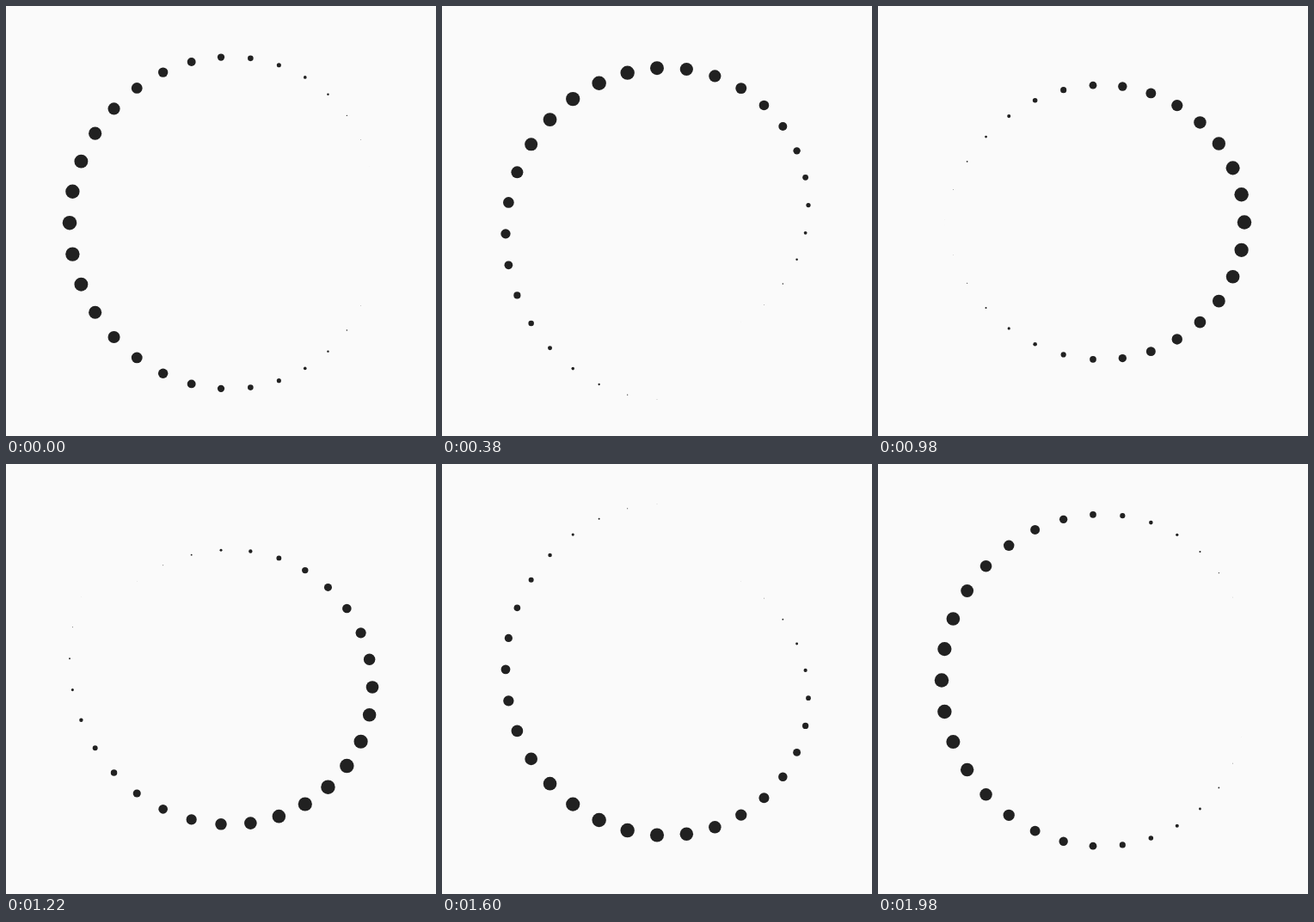
These frames come from a looping animation (500 by 500 pixels, 2000 ms). An HTML page with a canvas:

```html
<!DOCTYPE html>
<html lang="en">
<head>
<meta charset="utf-8">
<title>Falling dot ring</title>
<style>
html, body { margin: 0; width: 100%; height: 100%; overflow: hidden; background: #fafafa; }
canvas { display: block; width: 500px; height: 500px; }
</style>
</head>
<body>
<canvas id="stage" width="500" height="500"></canvas>
<script>
const ctx = document.getElementById('stage').getContext('2d');
const TAU = Math.PI * 2;
const LOOP = 2000, STEP = 20;
const DOTS = 32, RING = 176, CX = 250, CY = 252.2;
const DROP = 200 / 3, MAX_R = 8.25;

// Each dot falls steadily, swelling and shrinking, then restarts at size zero.
function draw(ms) {
  const turn = Math.floor((ms % LOOP) / STEP) * STEP / LOOP;
  ctx.fillStyle = '#fafafa';
  ctx.fillRect(0, 0, 500, 500);
  ctx.fillStyle = '#212121';
  for (let i = 0; i < DOTS; i++) {
    const angle = TAU * i / DOTS;
    const phase = (turn + 1 - i / DOTS) % 1;
    const r = MAX_R * (1 - Math.cos(TAU * phase)) / 2;
    const x = CX + RING * Math.cos(angle);
    const y = CY + RING * Math.sin(angle) + DROP * (phase - 0.5);
    ctx.beginPath();
    ctx.arc(x, y, r, 0, TAU);
    ctx.fill();
  }
}

let start = null;
function tick(now) {
  if (start === null) start = now;
  draw(now - start);
  requestAnimationFrame(tick);
}
draw(0);
requestAnimationFrame(tick);
</script>
</body>
</html>
```
